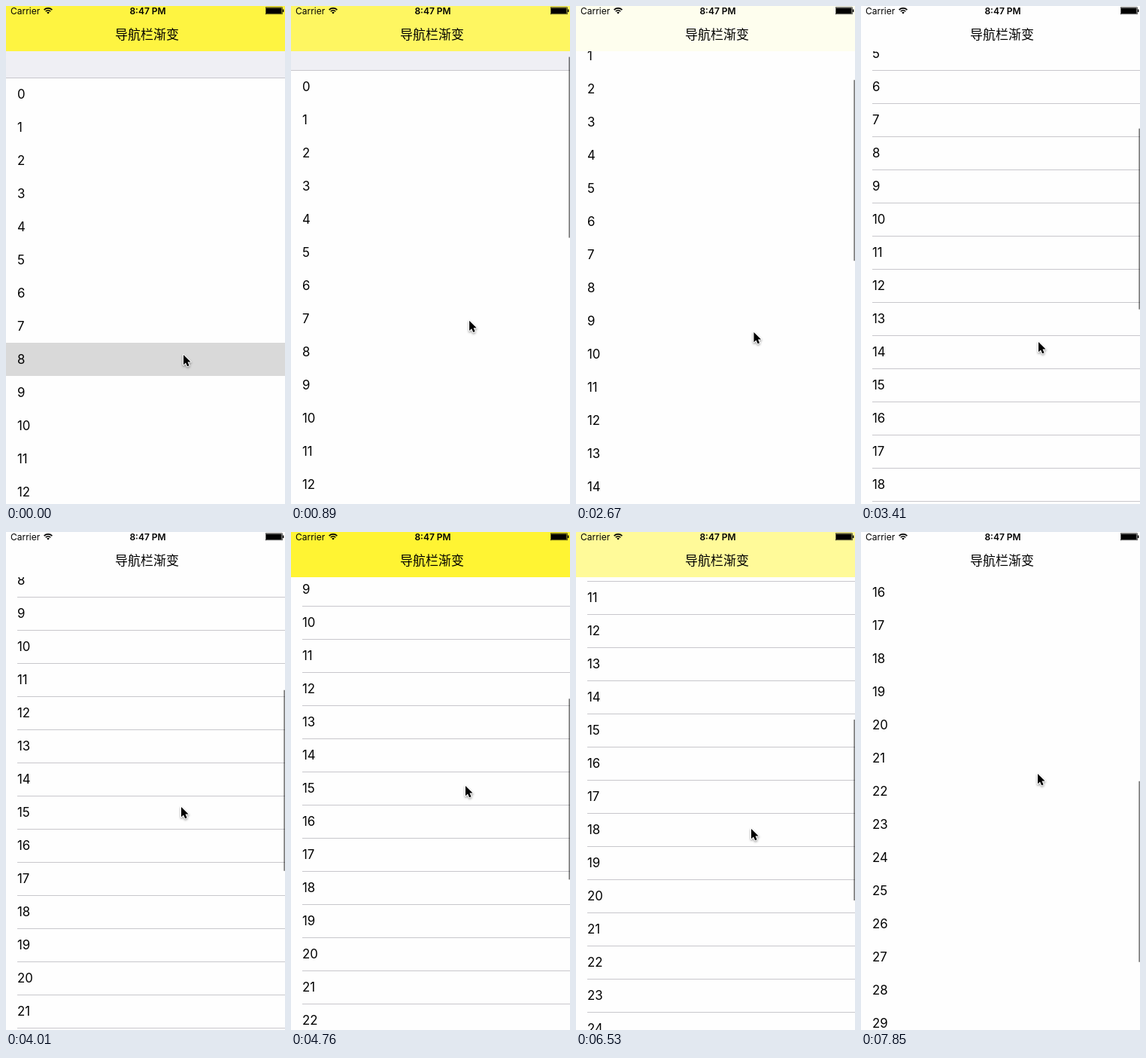
Write an HTML page with a canvas that moves like this. It is 371 px wide and 661 px high and loops after 8 s.

```html
<!DOCTYPE html>
<html lang="zh">
<head>
<meta charset="utf-8">
<title>导航栏渐变</title>
<style>
  html, body { margin: 0; width: 100%; height: 100%; overflow: hidden; background: #fefefe; }
  canvas { display: block; }
</style>
</head>
<body>
<canvas id="stage" width="371" height="661"></canvas>
<script>
const ctx = document.getElementById('stage').getContext('2d');
const W = 371, H = 661, BAR = 60, ROW = 44, LIST_TOP = 95;
const LOOP = 8000, STEPS = 54;
const UI_FONT = 'Inter, Roboto, sans-serif';

// step, scroll offset, bar tint, pointer x, pointer y, separators visible
const keys = [
  [0, 0, .74, 236, 463, 0],
  [2, 0, .74, 236, 463, 0],
  [9, 18, .52, 238, 384, 0],
  [10, 84, .47, 238, 360, 0],
  [14, 93, .25, 238, 352, 0],
  [15, 93, .25, 238, 352, 0],
  [19, 95, 0, 236, 460, 0],
  [20, 95, 0, 236, 460, 0],
  [23, 274, 0, 236, 446, 1],
  [27, 405, 0, 233, 365, 1],
  [30, 437, 0, 232, 340, 1],
  [31, 437, 0, 232, 340, 1],
  [32, 437, .8, 232, 337, 1],
  [34, 437, .74, 232, 318, 1],
  [36, 437, .74, 232, 318, 0],
  [38, 433, .67, 232, 307, 0],
  [41, 455, .55, 232, 350, 1],
  [44, 514, .4, 233, 394, 1],
  [49, 700, 0, 235, 330, 0],
  [51, 700, 0, 235, 330, 0],
  [53, 741, 0, 235, 321, 0]
];

function poseAt(step) {
  const next = Math.max(1, keys.findIndex(k => k[0] >= step));
  const a = keys[next - 1], b = keys[next];
  const p = (step - a[0]) / (b[0] - a[0]);
  const [, scroll, tint, x, y] = a.map((v, i) => v + (b[i] - v) * p);
  return { scroll: Math.round(scroll), tint, x, y, lines: p === 1 ? b[5] : a[5] };
}

function rect(color, x, y, w, h) {
  ctx.fillStyle = color;
  ctx.fillRect(x, y, w, h);
}

function text(str, x, y, font, align = 'left') {
  ctx.font = font;
  ctx.textAlign = align;
  ctx.fillStyle = '#000';
  ctx.fillText(str, x, y);
}

function drawList({ scroll, lines }, pressed) {
  const top = LIST_TOP - scroll;
  rect('#efeff4', 0, 0, W, top);
  rect('#c8c7cc', 0, top, W, 1);
  if (pressed) rect('#d9d9d9', 0, top + 8 * ROW, W, ROW);
  const first = Math.max(0, Math.floor((BAR - top) / ROW) - 1);
  for (let i = first; top + i * ROW < H; i++) {
    const y = top + i * ROW;
    text(i, 15, y + 28, `16.8px ${UI_FONT}`);
    if (lines) rect('#c8c7cc', 15, y + ROW, W - 15, 1);
  }
  if (scroll) rect('rgba(0,0,0,.5)', 369.3, 64 + scroll * .36, 1.7, 240);
}

function drawWifi(x, y) {
  ctx.strokeStyle = '#000';
  ctx.lineWidth = 1.6;
  for (const r of [4.6, 7.6]) {
    ctx.beginPath();
    ctx.arc(x, y, r, -Math.PI * .75, -Math.PI * .25);
    ctx.stroke();
  }
  ctx.fillStyle = '#000';
  ctx.beginPath();
  ctx.moveTo(x, y);
  ctx.arc(x, y, 2.6, -Math.PI * .75, -Math.PI * .25);
  ctx.fill();
}

function drawBar(tint) {
  rect('#fefefe', 0, 0, W, BAR);
  rect(`rgba(255,242,0,${tint})`, 0, 0, W, BAR);
  text('Carrier', 6, 10.5, `12px ${UI_FONT}`);
  drawWifi(56, 10.5);
  text('8:47 PM', 188.5, 10.5, `600 12px ${UI_FONT}`, 'center');
  ctx.strokeStyle = '#000';
  ctx.lineWidth = .6;
  ctx.strokeRect(345.3, 1.8, 22, 9);
  rect('#000', 346, 2.5, 20.6, 7.6);
  rect('#000', 368, 4.5, 1.4, 3.6);
  text('导航栏渐变', 187.5, 44, '500 17px "Noto Sans CJK SC", "Noto Sans CJK", sans-serif', 'center');
}

const arrow = new Path2D('M0 0V13.2L3 10.4L5.2 15.2L7.6 14.2L5.5 9.5H9.6Z');

function drawPointer(x, y) {
  ctx.save();
  ctx.translate(x, y);
  ctx.shadowColor = 'rgba(0,0,0,.4)';
  ctx.shadowBlur = 3;
  ctx.shadowOffsetY = 1.5;
  ctx.strokeStyle = '#fff';
  ctx.lineWidth = 2;
  ctx.lineJoin = 'round';
  ctx.stroke(arrow);
  ctx.shadowColor = 'transparent';
  ctx.fillStyle = '#000';
  ctx.fill(arrow);
  ctx.restore();
}

function draw(now) {
  const step = Math.floor((now % LOOP + 10) * STEPS / LOOP) % STEPS;
  const pose = poseAt(step);
  rect('#fefefe', 0, 0, W, H);
  drawList(pose, step < 3);
  drawBar(pose.tint);
  drawPointer(pose.x, pose.y);
}

const start = performance.now();
function tick() {
  draw(performance.now() - start);
  requestAnimationFrame(tick);
}
tick();
</script>
</body>
</html>
```
